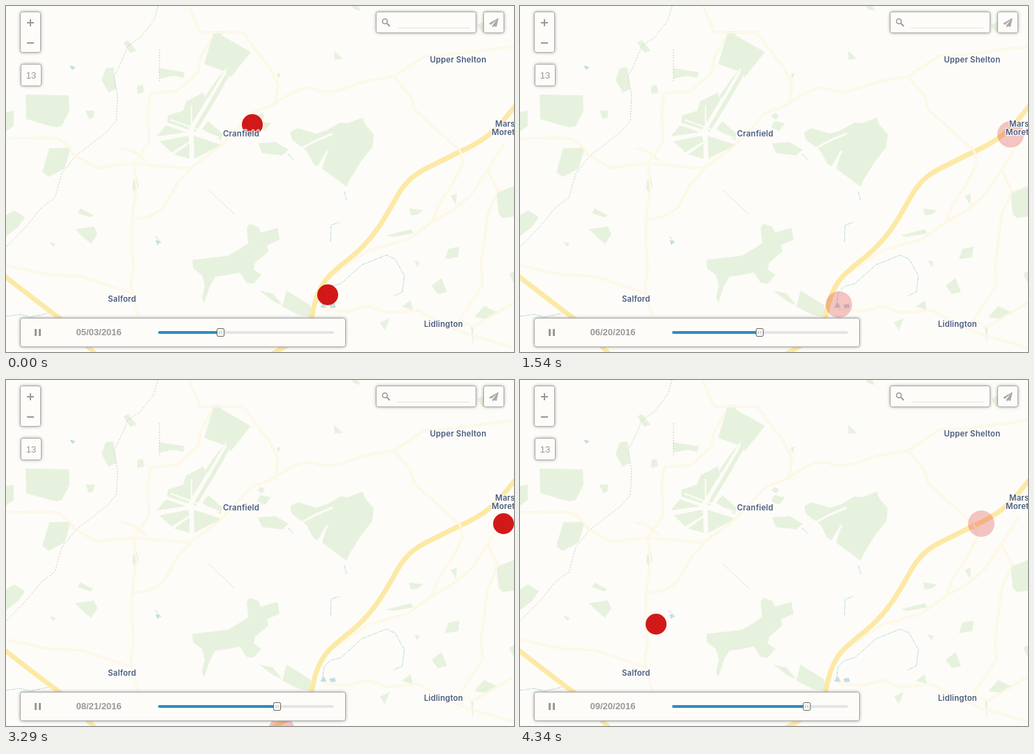
These frames come from a looping animation (728 px wide and 496 px high, 4.41 s). An HTML page:

```html
<!DOCTYPE html>
<html lang="en">
<head>
<meta charset="utf-8">
<title>Map timeline</title>
<style>
  html, body { margin: 0; width: 100%; height: 100%; overflow: hidden; background: #fdfcf8; }
  svg { display: block; }
  path { fill: none; stroke-linejoin: round; }
  #woods path { fill: #e7f2de; }
  .road { stroke: #fcf3d4; stroke-width: 3; }
  .core { stroke: #fefcf3; stroke-width: 1.4; }
  .motorway { stroke: #fde9a5; stroke-width: 7; }
  .water { stroke: #b9d8dc; stroke-width: 1; stroke-dasharray: 5 1 2 1; }
  .pond { fill: #c8dfe2; }
  .border { stroke: #c9c9cc; stroke-dasharray: 2 2; }
  #labels { font: 600 11.4px Inter, sans-serif; letter-spacing: .15px; fill: #4b5c7c; stroke: #fffd; stroke-width: 2.5px; stroke-linejoin: round; paint-order: stroke; }
  .box { fill: #fdfcf8; stroke: #a9a9a9; filter: drop-shadow(0 0 2px #0005); }
  .icon { stroke: #999; stroke-width: 2; }
  #ui text { font: 13px "Liberation Sans", Arial, sans-serif; fill: #999; }
  #ui #date { font-weight: bold; }
</style>
</head>
<body>
<svg width="728" height="496" viewBox="0 0 728 496">
  <rect width="728" height="496" fill="#fdfcf8"/>
  <g id="woods">
    <path d="M28 127L90 128 91 150 80 172 72 174 59 171 29 162ZM0 152L11 150V172L0 180ZM143 89L154 88 158 119 147 124 137 106ZM168 52L175 49 187 64 178 67ZM114 150H127L125 160 119 162ZM62 204L93 203 84 233 61 245 52 238ZM182 250L188 247 190 258 185 268 181 262Z"/>
    <path d="M0 300L12 293 27 303 17 317 0 330ZM107 290L125 300 121 303 103 297ZM99 320L126 316 131 327 122 341 112 333ZM64 338L71 341 69 345 64 342Z"/>
    <path d="M298 36H307L309 42 351 66 322 102 317 95 284 83ZM219 89L256 95 254 103 240 100 220 104ZM188 115L196 113 198 124 188 126Z"/>
    <path d="M258 137L283 124 287 135 261 177 231 167 232 157 254 150ZM216 187L229 171 258 181ZM220 194L261 186 263 194 237 210ZM241 213L263 197V219ZM269 186L309 199 270 219ZM281 176L290 165 310 183 308 193ZM318 92L327 87 299 137 272 181 268 178ZM304 103L313 93 289 134 285 130Z"/>
    <path d="M365 153L371 157 367 163 360 158ZM364 165L380 168 371 179 360 174ZM361 197L386 195 405 206 396 214 367 211ZM388 97L394 96 390 105Z"/>
    <path d="M407 181L418 175 444 183 460 178 479 167 490 168 511 160 515 170 527 184 525 202 508 224 493 248 488 259 453 233 461 208 447 230 440 226 431 208 410 192Z"/>
    <path d="M345 318L349 312 362 317 365 325 389 318 392 335 374 343 376 352 357 368 355 378 366 385 355 398 345 397 335 382 316 386 300 388 292 402 284 426 281 418 285 400 281 386 268 376 267 364 318 358 332 350 347 340Z"/>
    <path d="M402 408L436 429 438 446 420 443 396 431ZM363 408L382 412 396 429 384 424ZM703 268L728 258V302L712 304 706 298ZM578 290L598 293 590 299 580 300ZM545 329L580 320 584 326 555 331ZM634 348L650 345 648 360 629 363Z"/>
    <path d="M675 27L685 22 691 36 682 38ZM470 64L483 76 471 77ZM495 0H505L508 7 499 5ZM610 401L624 390 632 410 619 413ZM584 364L593 367 590 374ZM671 446L685 430 706 440 690 449ZM721 384L728 380V398ZM637 272L646 269 645 285ZM567 431L580 422 583 436ZM536 454L550 447 543 465ZM666 459L670 462 669 486Z"/>
  </g>
  <path d="M420 206L444 193 468 183M461 208L447 232" stroke="#fdfcf8" stroke-width="3"/>
  <path d="M316 90L258 187M236 163L306 189M266 142V215" stroke="#fdfcf8" stroke-width="2"/>
  <g class="water">
    <path d="M453 432L456 411 465 402 480 398 490 389 510 371 525 365 545 357 558 363 567 380 571 386 568 410 555 416M0 445L20 442 35 446 62 440M465 338L466 314 478 310M485 266L488 278M404 212L412 220M214 330L222 340"/>
    <path class="pond" d="M451 432L455 425 459 432ZM464 429L471 427 472 432 466 433ZM92 86L99 88 95 91ZM215 336L221 338 217 342Z"/>
  </g>
  <path class="border" d="M218 0L212 20 193 45 175 57 163 85 155 100 160 130 158 165 145 180 100 215 80 240 70 275 50 290 30 315 0 346M220 62V108"/>
  <path d="M291 264L328 299" stroke="#e3e3df"/>
  <defs>
    <path id="lanes" d="M0 190L60 189 76 191Q90 200 97 213L130 232 158 228 183 226 262 233Q290 215 310 198L352 153 375 145 411 124Q430 114 445 120T480 120L515 108 556 101 600 72 650 68 728 58M262 0L278 38 340 38 357 62 378 88 390 113 385 143M183 226L205 195 203 150 207 125 245 122 275 95 278 75 295 45M183 226L187 260 181 300 180 340 183 375 179 400 185 430 190 448M181 306L205 302 225 290 245 255 265 233M165 204L182 208 200 222M0 372L60 385 110 388 180 412"/>
    <path id="byways" d="M556 101L580 130 585 148 620 180 650 207 655 225 640 255 620 285 610 310 575 335 520 350 470 384M715 196L690 235 667 270 640 293 610 310M690 235L705 265 690 300 681 370 683 400 650 450 670 460 728 425M455 435L490 438 520 430 545 440 590 436 625 455 660 470 728 490"/>
  </defs>
  <g class="road"><use href="#lanes"/><use href="#byways"/></g>
  <g class="core"><use href="#lanes"/><use href="#byways"/></g>
  <path class="motorway" d="M375 502L415 480Q435 464 439 442 445 405 465 385 480 371 497 358C530 330 545 300 562 270 575 248 590 238 612 228L650 209C680 196 700 180 712 165L735 137M-5 385L48 426 80 450 130 501"/>
  <path d="M648 203L653 213" stroke="#fdf8e4" stroke-width="3"/>

  <g id="dots" fill="#c00"></g>

  <g id="labels">
    <text x="311" y="187">Cranfield</text>
    <text x="607.5" y="80.5">Upper Shelton</text>
    <text x="701" y="173">Marston</text>
    <text x="696" y="184.5">Moretaine</text>
    <text x="146" y="424">Salford</text>
    <text x="599" y="460">Lidlington</text>
  </g>

  <g id="ui">
    <rect class="box" x="20.5" y="8.5" width="29" height="58" rx="3"/>
    <path class="icon" d="M30 24H40M35 19V29M30 53H40"/>
    <rect class="box" x="21.5" y="83.5" width="29" height="31" rx="3"/>
    <text x="36" y="104" text-anchor="middle">13</text>

    <rect class="box" x="530.5" y="8.5" width="143" height="30" rx="3"/>
    <circle cx="543" cy="22" r="3.5" fill="none" stroke="#999" stroke-width="1.6"/>
    <path class="icon" d="M546 25L550 29"/>
    <path d="M561 31.5H664" stroke="#ccc" stroke-dasharray="1 1"/>
    <rect class="box" x="684.5" y="8.5" width="29" height="30" rx="3"/>
    <path d="M706 17L692 25 695 27 703 20 697 28 697 31 699 29 703 30Z" style="fill:#aaa"/>

    <rect class="box" x="20.5" y="447.5" width="466" height="41" rx="3"/>
    <path d="M42.5 463V473M48.5 463V473" stroke="#999" stroke-width="3"/>
    <text id="date" x="100.5" y="472"></text>
    <rect x="218" y="466" width="252" height="4" rx="2" fill="#e4e4e4"/>
    <rect id="fill" x="218" y="466" height="4" rx="2" fill="#318bc1"/>
    <g id="handle">
      <rect x="-5" y="462.5" width="10" height="11" rx="1.5" fill="#fff" stroke="#666"/>
      <path d="M-1.5 465.5V470.5M1.5 465.5V470.5" stroke="#aaa"/>
    </g>
  </g>
</svg>
<script>
const LOOP = 4410, TICK = 70, STEP = 190;
const DAY = 864e5, START = Date.UTC(2016, 4, 3);
const $ = id => document.getElementById(id);

// [step, x, y]
const events = [
  [0, 353, 170], [0, 461, 414], [4, 191, 426], [5, 641, 473],
  [6, 703, 184], [6, 457, 428], [12, 565, 106], [16, 395, 502],
  [18, 713, 206], [21, 661, 206], [23, 195, 350]
];

// Each dot grows and halves its opacity for two steps, then vanishes.
function dot([born, x, y], step) {
  const age = step - born;
  if (age < 0 || age > 2) return "";
  return `<circle cx="${x}" cy="${y}" r="${15 + 2 * age}" opacity="${0.9 / 2 ** age}"/>`;
}

function dateText(step) {
  const [y, m, d] = new Date(START + Math.floor(step * 6.115 + 0.03) * DAY)
    .toISOString().slice(0, 10).split("-");
  return `${m}/${d}/${y}`;
}

let shown = -1;
function draw(now) {
  const t = Math.floor(now % LOOP / TICK) * TICK;
  const step = Math.floor(t / STEP + 0.71);
  if (step !== shown) {
    shown = step;
    const x = 307.5 + 4.5 * step;
    $("dots").innerHTML = events.map(e => dot(e, step)).join("");
    $("date").textContent = dateText(step);
    $("fill").setAttribute("width", x - 218);
    $("handle").setAttribute("transform", `translate(${x})`);
  }
  requestAnimationFrame(draw);
}
draw(0);
</script>
</body>
</html>
```
